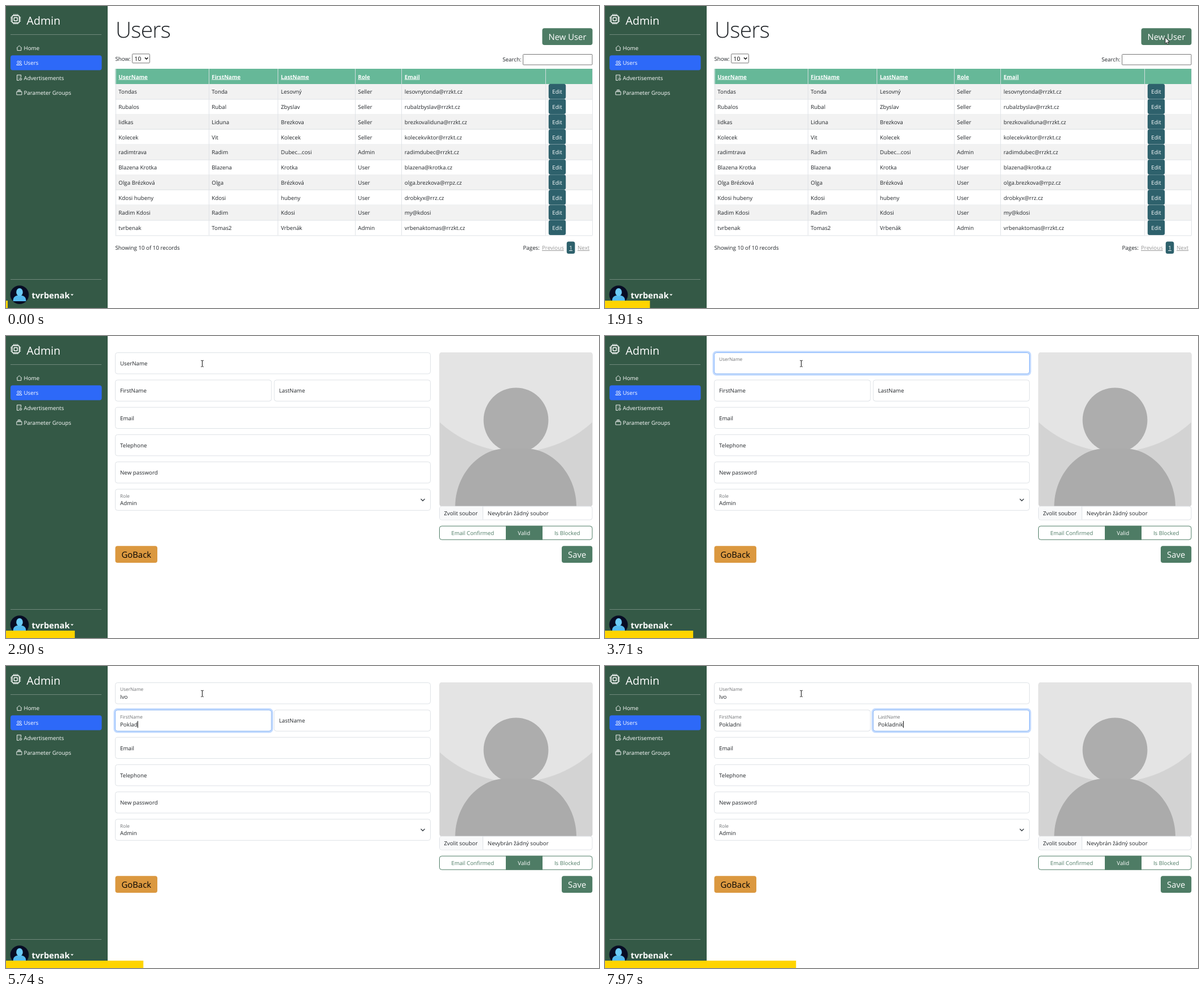
These frames come from a looping animation (1050 px wide and 534 px high, 8000 ms). An HTML page:

```html
<!DOCTYPE html>
<html lang="cs">
<head>
<meta charset="utf-8">
<title>Admin</title>
<style>
  html, body { margin: 0; width: 100%; height: 100%; overflow: hidden; background: #fff; }
  svg { display: block; width: 1050px; height: 534px; }
  text {
    font: 9.75px "Open Sans", "Noto Sans", sans-serif;
    fill: #212529; text-rendering: geometricPrecision; white-space: pre;
  }
</style>
</head>
<body>
<svg id="stage" viewBox="0 0 1050 534"></svg>
<script>
const LOOP = 8000;
const GREEN = '#4e7c65', TEAL = '#2e616c', LINE = '#dee2e6';
const stage = document.getElementById('stage');

function el(parent, tag, attrs = {}) {
  const node = document.createElementNS('http://www.w3.org/2000/svg', tag);
  for (const key in attrs) node.setAttribute(key, attrs[key]);
  parent.appendChild(node);
  return node;
}
const group = (parent, attrs) => el(parent, 'g', attrs);
const rect = (parent, x, y, width, height, fill, more) =>
  el(parent, 'rect', { x, y, width, height, fill, ...more });
const path = (parent, d, more) => el(parent, 'path', { d, fill: 'none', ...more });
function text(parent, x, y, str, style = '') {
  const node = el(parent, 'text', { x, y, style });
  node.textContent = str;
  return node;
}
function button(parent, x, y, w, label, fill, ink) {
  rect(parent, x, y, w, 29.7, fill, { rx: 4 });
  text(parent, x + w / 2, y + 20.8, label, `font-size:14.85px;text-anchor:middle;fill:${ink}`);
}

// Sidebar
const icons = {
  Home: 'M1 8 8 1.5 15 8M2.7 7V14.5H13.3V7',
  Users: 'M5 8A2.6 2.6 0 1 1 5.1 8M11 8A2.6 2.6 0 1 1 11.1 8M1 14C1 9 9 9 9 14ZM9 10C12 8.5 15 10.5 15 14H10',
  Advertisements: 'M8 15.3H2V.7H13V7M5 3.5H6M9 3.5H10M5 6.5H6M9 6.5H10M5 9.5H6M5 12.5H6M12 9A3 3 0 1 1 11.9 9M12 11V13',
  'Parameter Groups': 'M4.5 1H11.5M2.5 3.5H13.5M1 6H15V14.3H1Z'
};
function drawSidebar() {
  const side = group(stage);
  rect(side, 0, 0, 180, 534, '#345946');
  const cpu = group(side, { transform: 'translate(7.8 14) scale(1.17)', stroke: '#fff', fill: 'none' });
  rect(cpu, 2.6, 2.6, 10.8, 10.8, 'none', { rx: 1.6, 'stroke-width': 1.2 });
  rect(cpu, 5.5, 5.5, 5, 5, 'none', { rx: .6, 'stroke-width': 1.2 });
  for (const p of [5, 7, 9, 11])
    path(cpu, `M${p} .3V2.3M${p} 13.7V15.7M.3 ${p}H2.3M13.7 ${p}H15.7`);
  text(side, 36.5, 32.5, 'Admin', 'font-size:19.7px;fill:#fff');
  rect(side, 8, 50, 161, 1, '#71897c');
  rect(side, 8, 483, 161, 1, '#71897c');
  rect(side, 8, 87.3, 161.5, 26.2, '#2d69f8', { rx: 4 });
  Object.keys(icons).forEach((name, i) => {
    const y = 78.2 + i * 26.15;
    path(side, icons[name], {
      transform: `translate(18.2 ${y - 9}) scale(.65)`, stroke: '#fff', 'stroke-width': 1.4
    });
    text(side, 31.5, y, name, 'fill:#fff');
  });
  el(side, 'circle', { cx: 24, cy: 510.6, r: 16.4, fill: '#080d24' });
  path(side, 'M12.5 522C12.5 513 18 511.5 24 511.5S35.5 513 35.5 522Z', { fill: '#55b9ee' });
  el(side, 'ellipse', { cx: 24, cy: 506, rx: 5.8, ry: 7, fill: '#6ccbf8' });
  text(side, 45.5, 516.7, 'tvrbenak', 'font-size:14.75px;font-weight:700;fill:#fff');
  path(side, 'M114.3 509.5H119.7L117 512.2Z', { fill: '#fff' });
}

// User list
const columns = [193.5, 358.5, 481, 617.5, 700, 955];
const rows = `Tondas|Tonda|Lesovný|Seller|lesovnytonda@rrzkt.cz
Rubalos|Rubal|Zbyslav|Seller|rubalzbyslav@rrzkt.cz
lidkas|Liduna|Brezkova|Seller|brezkovaliduna@rrzkt.cz
Kolecek|Vit|Kolecek|Seller|kolecekviktor@rrzkt.cz
radimtrava|Radim|Dubec...cosi|Admin|radimdubec@rrzkt.cz
Blazena Krotka|Blazena|Krotka|User|blazena@krotka.cz
Olga Brézková|Olga|Brézková|User|olga.brezkova@rrpz.cz
Kdosi hubeny|Kdosi|hubeny|User|drobkyx@rrz.cz
Radim Kdosi|Radim|Kdosi|User|my@kdosi
tvrbenak|Tomas2|Vrbenák|Admin|vrbenaktomas@rrzkt.cz`.split('\n').map(r => r.split('|'));

function drawList() {
  const list = group(stage);
  text(list, 194, 55.5, 'Users', 'font-size:39px;font-weight:300;letter-spacing:-.02em');
  button(list, 949.5, 39.3, 89, 'New User', GREEN, '#fff');
  text(list, 193.5, 97, 'Show:');
  rect(list, 223.5, 84.8, 31, 16, '#fff', { stroke: '#767676', rx: 1.5 });
  text(list, 227.5, 97, '10', 'font-size:10.3px;fill:#000');
  path(list, 'M246 91.3 248.7 94 251.4 91.3', { stroke: '#000', 'stroke-width': 1.4 });
  text(list, 912.5, 98.3, 'Search:', 'text-anchor:end');
  rect(list, 915.5, 85.5, 122.5, 18.5, '#fff', { stroke: '#767676', rx: 1 });

  const top = 138, step = 26.75, right = 1038;
  rect(list, 193.5, 111, 845, 27, '#66b898');
  const head = ['UserName', 'FirstName', 'LastName', 'Role', 'Email'];
  head.forEach((h, i) => text(list, columns[i] + 5.8, 128.5, h,
    'font-weight:700;fill:#fff;text-decoration:underline'));
  rows.forEach((row, r) => {
    const y = top + r * step;
    if (r % 2 === 0) rect(list, 193.5, y, 845, step, '#f2f2f2');
    rect(list, 193.5, Math.round(y + step) - .5, 845, 1, LINE);
    row.forEach((cell, i) => text(list, columns[i] + 5.8, y + 17.3, cell));
  });
  for (const x of [...columns, right])
    rect(list, Math.round(x), 111, 1, 294.5, LINE, { opacity: .9 });
  rows.forEach((_, r) => {
    const y = top + r * step;
    rect(list, 960.8, y - .2, 30.4, 26.4, TEAL, { rx: 3.5 });
    text(list, 976, y + 17.3, 'Edit', 'fill:#fff;text-anchor:middle');
  });
  text(list, 193.5, 431, 'Showing 10 of 10 records');
  text(list, 915.5, 431, 'Pages:');
  const link = 'text-decoration:underline;fill:';
  text(list, 949, 431, 'Previous', link + '#999');
  rect(list, 992.8, 416.5, 14.6, 21.5, TEAL, { rx: 3.5 });
  text(list, 1000.1, 431, '1', link + '#fff;text-anchor:middle');
  text(list, 1012, 431, 'Next', link + '#999');
  return list;
}

// Form: on/off are focus times, keys are key press times
const fields = [
  { label: 'UserName', x: 193.5, y: 29.5, w: 558, value: 'Ivo', on: 3130, off: 4565, keys: [3750, 4050, 4330] },
  { label: 'FirstName', x: 193.5, y: 77.8, w: 276.5, value: 'Pokladni', on: 4565, off: 6500,
    keys: [5140, 5260, 5380, 5500, 5600, 5700, 5960, 6080] },
  { label: 'LastName', x: 475, y: 77.8, w: 276.5, value: 'Pokladnik', on: 6500, off: 9000,
    keys: [6850, 7000, 7150, 7300, 7450, 7600, 7720, 7820, 7930] },
  { label: 'Email', x: 193.5, y: 126.1, w: 558 },
  { label: 'Telephone', x: 193.5, y: 174.4, w: 558 },
  { label: 'New password', x: 193.5, y: 222.6, w: 558 }
];
const SMALL = 'font-size:8.3px;fill:#6f7275';

function drawBox(parent, f) {
  return rect(parent, f.x, f.y, f.w, 37.4, '#fff', { rx: 4, stroke: LINE });
}
function drawForm() {
  const form = group(stage);
  for (const f of fields) {
    f.glow = rect(form, f.x - 1.7, f.y - 1.7, f.w + 3.4, 40.8, 'none',
      { rx: 5.5, stroke: '#0d6efd', 'stroke-width': 2.6, opacity: 0 });
    drawBox(form, f);
    f.edge = rect(form, f.x, f.y, f.w, 37.4, 'none', { rx: 4, stroke: '#86b7fe', opacity: 0 });
    f.name = text(form, 0, 0, f.label);
    f.name.setAttribute('transform', `translate(${f.x + 8.5} ${f.y + 22.6})`);
    if (!f.keys) continue;
    f.typed = text(form, f.x + 8.5, f.y + 28.8, '');
    f.caret = rect(form, 0, f.y + 19.5, 1, 12, '#000');
  }
  drawBox(form, { x: 193.5, y: 270.9, w: 558 });
  text(form, 202, 285.6, 'Role', SMALL);
  text(form, 202, 299, 'Admin');
  path(form, 'M734.5 288 738 291.5 741.5 288', { stroke: '#343a40', 'stroke-width': 1.3 });

  const photo = group(form);
  const clip = el(el(photo, 'clipPath', { id: 'frame' }), 'rect',
    { x: 767.5, y: 29.3, width: 271, height: 271.7, rx: 4 });
  const art = group(photo, { 'clip-path': 'url(#frame)' });
  rect(art, 767, 29, 272, 273, '#d3d3d3');
  el(art, 'circle', { cx: 903, cy: 5, r: 200, fill: '#e4e4e4' });
  el(art, 'circle', { cx: 903, cy: 148.8, r: 57.4, fill: '#adadad' });
  path(art, 'M795.3 302C795.3 245 838 199.3 884 199.3H921C968 199.3 1010 245 1010 302Z', { fill: '#ababab' });

  const file = group(form);
  rect(file, 767.5, 45.5, 270.5, 24, '#fff', { rx: 4, stroke: LINE });
  rect(file, 768, 46, 76.5, 23, '#f8f9fa', { rx: 3 });
  rect(file, 844, 46, 1, 23, LINE);
  text(file, 775.5, 61.2, 'Zvolit soubor');
  text(file, 852.8, 61.2, 'Nevybrán žádný soubor');
  rect(file, 767.5, 80.5, 270.5, 24, '#fff', { rx: 4, stroke: GREEN });
  rect(file, 885, 80, 65, 25, GREEN);
  [['Email Confirmed', 826.3, GREEN], ['Valid', 917.3, '#fff'], ['Is Blocked', 993.7, GREEN]]
    .forEach(([s, x, c]) => text(file, x, 96.4, s, `text-anchor:middle;fill:${c}`));

  const actions = group(form);
  button(actions, 193.5, 329.5, 74.5, 'GoBack', '#db983f', '#000');
  button(actions, 984, 329.5, 54.3, 'Save', GREEN, '#fff');
  return { form, photo, file, actions };
}

drawSidebar();
const list = drawList();
const { form, photo, file, actions } = drawForm();
const bar = rect(stage, 0, 521, 3, 13, '#ffd400');
const arrow = path(stage, 'M0 0V11L2.5 8.8 4.2 12.5 5.9 11.7 4.2 8.1H7.6Z',
  { fill: '#fff', stroke: '#222', 'stroke-width': .9 });
const beam = path(stage, 'M-2.3 -5.5H-.7L0 -4.8 .7 -5.5H2.3M0 -5V5M-2.3 5.5H-.7L0 4.8 .7 5.5H2.3',
  { stroke: '#111', 'stroke-width': 1 });

// Motion
const PAGE = 2170, PHOTO = 2420;
const pointer = [[500, 556, 540], [860, 582, 431], [1020, 598, 413.5], [1210, 598, 413.5],
  [1600, 984, 34], [1720, 986, 46], [1850, 992, 55.5], [2350, 992, 55.5], [2750, 347.5, 48.8]];
const ticks = [[0, 0], [60, 1], [920, 13], [1790, 27], [2650, 41], [3470, 54], [4320, 68],
  [5130, 81], [5940, 94], [6800, 108], [7610, 121], [8000, 128]];

const clamp = v => Math.min(1, Math.max(0, v));
const ease = v => (v = clamp(v), v * v * (3 - 2 * v));
function at(table, t, col, curve) {
  let i = 0;
  while (i < table.length - 2 && t >= table[i + 1][0]) i++;
  const [a, b] = [table[i], table[i + 1]];
  return a[col] + (b[col] - a[col]) * curve((t - a[0]) / (b[0] - a[0]));
}
const show = (node, on) => node.setAttribute('display', on ? 'inline' : 'none');
const shift = (node, x, y) => node.setAttribute('transform', `translate(${x} ${y})`);

function drawField(f, t) {
  const focus = ease((t - f.on) / 150) - ease((t - f.off) / 150);
  const up = ease((t - f.on) / 100);
  f.glow.setAttribute('opacity', .25 * focus);
  f.edge.setAttribute('opacity', focus);
  f.name.setAttribute('transform',
    `translate(${f.x + 8.5} ${f.y + 22.6 - 7.8 * up}) scale(${1 - .15 * up})`);
  f.name.setAttribute('opacity', 1 - .35 * up);
  const count = f.keys.filter(k => k <= t).length;
  f.typed.textContent = f.value.slice(0, count);
  const last = count ? f.keys[count - 1] : f.on;
  show(f.caret, t >= f.on && t < f.off && (t - last) % 1060 < 530);
  f.caret.setAttribute('x', f.x + 8.5 + (count ? f.typed.getComputedTextLength() : 0));
}

function render(t) {
  const onForm = t >= PAGE, loaded = t >= PHOTO;
  show(list, !onForm);
  show(form, onForm);
  show(photo, loaded);
  shift(file, 0, loaded ? 255.6 : 0);
  shift(actions, 0, loaded ? 41.8 : 0);
  if (onForm) fields.filter(f => f.keys).forEach(f => drawField(f, t));

  const tick = Math.floor(at(ticks, t, 1, clamp) + .3);
  bar.setAttribute('width', 3 + 2.64 * tick);

  const x = at(pointer, t, 1, ease), y = at(pointer, t, 2, ease);
  const typing = onForm && x < 751;
  show(arrow, t >= 500 && !typing);
  show(beam, typing);
  shift(typing ? beam : arrow, x, y);
}

const start = performance.now();
function loop() {
  render((performance.now() - start) % LOOP);
  requestAnimationFrame(loop);
}
loop();
</script>
</body>
</html>
```
